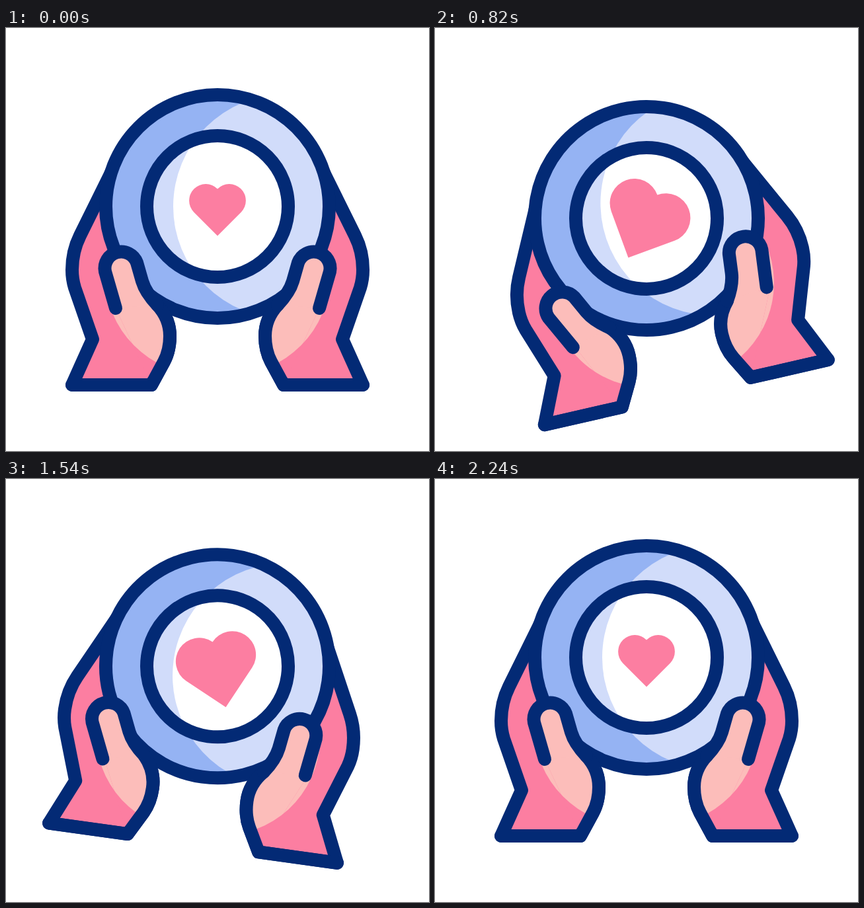
An HTML page that plays this animation: 640 by 640 pixels, repeating every 2.4 s.

```html
<!DOCTYPE html>
<html lang="en">
<head>
<meta charset="utf-8">
<title>Hands holding a plate</title>
<style>
  html, body { margin: 0; width: 100%; height: 100%; overflow: hidden; background: #fff; }
  svg { display: block; width: 100vw; height: 100vh; }
  .line { fill: none; stroke: #032a75; stroke-width: 20; stroke-linecap: round; stroke-linejoin: round; }
  .pink { fill: #fc7ea1; }
  .skin { fill: #fcbdba; }
  .blue { fill: #95b3f3; }
  .pale { fill: #d1dcfa; }
  .white { fill: #fff; }
</style>
</head>
<body>
<svg viewBox="0 0 640 640">
  <defs>
    <path id="arm" d="M160 217L112 314Q100 338 100 366Q100 380 104 393L131 471L100 540H220L239 505Q248 488 248 466C248 448 241 432 229 419"/>
    <path id="palm" d="M166 424L195 402L229 419C241 432 248 448 248 466Q248 488 239 505L220 540Z"/>
    <path id="edge" d="M229 419C241 432 248 448 248 466Q248 488 239 505L220 540H100"/>
    <path id="thumb" d="M166 424L150 368.5A25 25 0 0 1 198 355L206 383Q211 400 229 419"/>
    <circle id="glow" cx="299" cy="375" r="149"/>
    <circle id="shine" cx="423" cy="270" r="170"/>
    <circle id="rim" cx="320" cy="270" r="169"/>
    <circle id="dish" cx="320" cy="270" r="107"/>
    <clipPath id="inArm"><use href="#arm"/></clipPath>
    <clipPath id="inPalm"><use href="#palm"/></clipPath>
    <clipPath id="inRim"><use href="#rim"/></clipPath>
    <clipPath id="inDish"><use href="#dish"/></clipPath>
    <g id="back">
      <use href="#arm" class="pink"/>
      <g clip-path="url(#inArm)"><use href="#glow" class="skin"/></g>
      <use href="#arm" class="line"/>
    </g>
    <g id="front">
      <use href="#palm" class="pink"/>
      <g clip-path="url(#inPalm)"><use href="#glow" class="skin"/></g>
      <use href="#edge" class="line"/>
    </g>
    <g id="finger">
      <use href="#thumb" class="skin"/>
      <use href="#thumb" class="line"/>
    </g>
  </defs>
  <g id="scene">
    <use href="#back"/>
    <use href="#back" transform="matrix(-1 0 0 1 640 0)"/>
    <use href="#rim" class="blue"/>
    <g clip-path="url(#inRim)"><use href="#shine" class="pale"/></g>
    <use href="#rim" class="line"/>
    <use href="#dish" class="pale"/>
    <g clip-path="url(#inDish)"><use href="#shine" class="white"/></g>
    <use href="#dish" class="line"/>
    <g>
      <use href="#front"/>
      <use href="#finger" id="left"/>
    </g>
    <g transform="matrix(-1 0 0 1 640 0)">
      <use href="#front"/>
      <use href="#finger" id="right"/>
    </g>
  </g>
  <path id="heart" class="pink" d="M0 44.4L-35.7 8.7A25 25 0 0 1 0 -26.4A25 25 0 0 1 35.7 8.7Z"/>
</svg>
<script>
  const BOB = [200, 700, 1200, 1700, 2200];
  const SWAY = [200, 800, 1400, 1800, 2200];
  const el = id => document.getElementById(id);
  const move = (id, value) => el(id).setAttribute('transform', value);

  // Eased value at time t between keyed values
  function ease(t, times, values) {
    if (t <= times[0]) return values[0];
    const i = times.findIndex(k => t < k);
    if (i < 0) return values[values.length - 1];
    const u = (t - times[i - 1]) / (times[i] - times[i - 1]);
    return values[i - 1] + (values[i] - values[i - 1]) * u * u * (3 - 2 * u);
  }

  function draw(now) {
    const t = now % 2400;
    const bob = ease(t, BOB, [0, 1, -1, 1, 0]);
    const y = 25.5 * bob;
    const tilt = ease(t, SWAY, [0, -13, 15, -10, 0]);
    const turn = ease(t, SWAY, [0, 25, -20, 10, 0]);
    const size = ease(t, BOB, [1, 1.56, 1, 1.56, 1]);
    move('scene', `translate(0 ${y}) rotate(${tilt} 320 270)`);
    move('left', `rotate(${-15 * bob} 229 419)`);
    move('right', `rotate(${15 * bob} 229 419)`);
    move('heart', `translate(320 ${270 + y}) rotate(${turn}) scale(${size})`);
  }

  const start = performance.now();
  function loop() {
    draw(performance.now() - start);
    requestAnimationFrame(loop);
  }
  loop();
</script>
</body>
</html>
```
